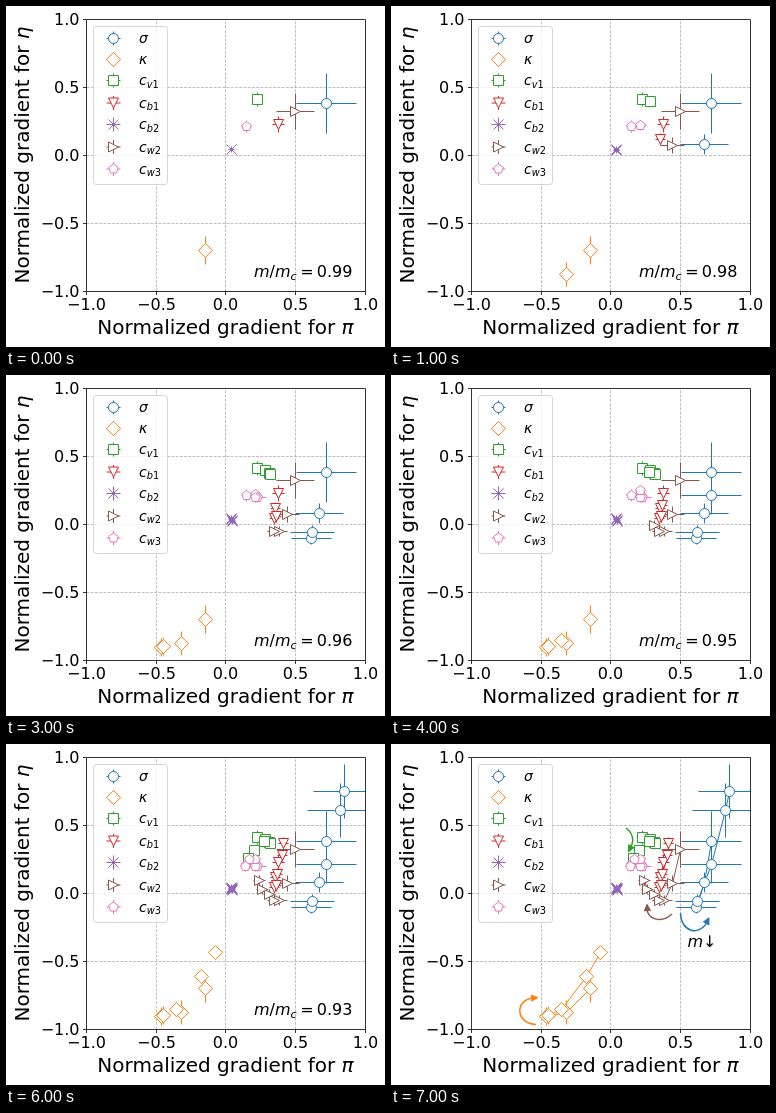
An HTML page that plays this animation: 379x341 px, repeating every 10000 ms.

```html
<!DOCTYPE html>
<html lang="en">
<head>
<meta charset="utf-8">
<title>Normalized gradients</title>
<style>
  html, body { margin: 0; width: 100%; height: 100%; overflow: hidden; background: #fff; }
  svg { display: block; width: 379px; height: 341px; }
  text { font-family: "DejaVu Sans", sans-serif; font-size: 16px; fill: #000; white-space: pre; }
  .title { font-size: 20px; text-anchor: middle; }
  .key { font-size: 14px; }
  .it { font-style: italic; }
</style>
</head>
<body>
<svg id="stage" viewBox="0 0 379 341"></svg>
<script>
const STEP = 1000, LOOP = 10000, LAST = 7;
const BOX = { left: 80.5, right: 359.5, top: 13.5, bottom: 285.5 };

// Points are [x, y] or [x, y, xError, yError]; err is the default error pair.
const series = [
  { name: 'σ', color: '#1f77b4', shape: 'circle', err: [30, 27], points: [
    [320, 97, 30, 30], [313, 138, 24, 10], [305, 163, 20, 6], [306, 157, 22, 7],
    [320, 120, 30, 19], [334, 66, 33, 27], [338, 47, 31, 27]] },
  { name: 'κ', color: '#ff7f0e', shape: 'diamond', err: [7, 9], points: [
    [199, 244, 6, 14], [175, 268, 7, 12], [155, 272], [157, 271],
    [170, 265, 6, 7], [195, 232, 5, 7], [209, 208, 4, 4]] },
  { name: 'c', sub: 'v', digit: 1, color: '#2ca02c', shape: 'square', err: [5, 5], points: [
    [251, 93, 5, 7], [259, 95], [263, 98], [264, 99], [258, 97], [248, 106], [242, 114]] },
  { name: 'c', sub: 'b', digit: 1, color: '#d62728', shape: 'down', err: [5, 6], points: [
    [272, 118, 6, 8], [269, 133], [268, 143], [270, 141], [271, 130], [276, 111], [277, 99]] },
  { name: 'c', sub: 'b', digit: 2, color: '#9467bd', shape: 'cross', err: [3, 3], points: [
    [225, 143], [225, 144], [226, 146], [226, 145], [225, 144], [226, 144], [225, 145]] },
  { name: 'c', sub: 'w', digit: 2, color: '#8c564b', shape: 'right', err: [6, 5], points: [
    [289, 105, 19, 18], [281, 139, 12, 8], [273, 156, 8, 5], [268, 156, 7, 5],
    [263, 150], [256, 145], [253, 136]] },
  { name: 'c', sub: 'w', digit: 3, color: '#e377c2', shape: 'pentagon', err: [5, 5], points: [
    [240, 120, 5, 6], [249, 119, 6, 5], [251, 122, 9, 5], [249, 122, 7, 5],
    [249, 115], [243, 115], [239, 122]] }
];

const pentagon = 'M' + [0, 1, 2, 3, 4].map(i => {
  const a = i * Math.PI * 0.4;
  return `${5 * Math.sin(a)} ${-5 * Math.cos(a)}`;
}).join('L') + 'Z';

const shapes = {
  circle: 'M-5 0A5 5 0 1 1 5 0A5 5 0 1 1 -5 0Z',
  diamond: 'M0 -7.07L7.07 0L0 7.07L-7.07 0Z',
  square: 'M-5 -5H5V5H-5Z',
  down: 'M0 5L-5 -5H5Z',
  right: 'M5 0L-5 5V-5Z',
  cross: 'M-5 -5L5 5M-5 5L5 -5',
  pentagon
};

const stage = document.getElementById('stage');

function add(parent, tag, attrs = {}, text) {
  const el = document.createElementNS('http://www.w3.org/2000/svg', tag);
  for (const key in attrs) el.setAttribute(key, attrs[key]);
  if (text !== undefined) el.textContent = text;
  return parent.appendChild(el);
}

const line = (parent, d, stroke, width = 1, more = {}) =>
  add(parent, 'path', { d, stroke, 'stroke-width': width, fill: 'none', ...more });

const marker = (parent, s, x, y) =>
  add(parent, 'path', {
    d: shapes[s.shape], transform: `translate(${x} ${y})`, fill: '#fff',
    stroke: s.color, 'stroke-linejoin': 'miter'
  });

const bars = (parent, s, x, y, ex, ey) =>
  line(parent, `M${x - ex} ${y}H${x + ex}M${x} ${y - ey}V${y + ey}`, s.color);

// Grid
const gridX = [150.5, 219.5, 289.5], gridY = [81.5, 149.5, 217.5];
const { left, right, top: upper, bottom } = BOX;
const dash = { 'stroke-dasharray': '2.96 1.28' };
gridX.forEach(x => line(stage, `M${x} ${bottom}V${upper}`, '#b0b0b0', 0.8, dash));
gridY.forEach(y => line(stage, `M${left} ${y}H${right}`, '#b0b0b0', 0.8, dash));

// Data: every error bar lies below every marker
const clip = add(add(stage, 'defs'), 'clipPath', { id: 'axes' });
add(clip, 'rect', { x: left, y: upper, width: right - left, height: bottom - upper });
const data = add(add(stage, 'g', { 'clip-path': 'url(#axes)' }), 'g', { transform: 'translate(.5 .5)' });
const barLayer = add(data, 'g');
const markLayer = add(data, 'g');
const timed = [];
const show = (el, from, to = LAST) => timed.push({ el, from, to });

for (const s of series) {
  show(line(markLayer, 'M' + s.points.map(p => `${p[0]} ${p[1]}`).join('L'), s.color), LAST);
  s.points.forEach(([x, y, ex = s.err[0], ey = s.err[1]], i) => {
    show(bars(barLayer, s, x, y, ex, ey), i);
    show(marker(markLayer, s, x, y), i);
  });
}

// Turning arrows
const arrows = add(stage, 'g');
show(arrows, LAST);
function arrow(color, d, x, y, angle) {
  line(arrows, d, color, 1.5);
  add(arrows, 'path', {
    d: 'M0 0L-6 -3V3Z', fill: color, stroke: color, 'stroke-linejoin': 'round',
    transform: `translate(${x} ${y}) rotate(${angle})`
  });
}
arrow('#2ca02c', 'M235 84Q245.5 92 239.5 104', 237.5, 107.5, 118);
arrow('#ff7f0e', 'M145 280.5C125 280 123 256 142 254', 146.5, 253.5, -6);
arrow('#8c564b', 'M281 170C270 180 256 175 256 164', 256, 160.5, -94);
arrow('#1f77b4', 'M289.5 169C290 188 308 193 316.5 177.5', 318, 174, -62);

// Axes
line(stage, `M${left} ${upper}H${right}V${bottom}H${left}Z`, '#000', 0.8);
[left, ...gridX, right].forEach((x, i) => {
  line(stage, `M${x} ${bottom}v3.5`, '#000', 0.8);
  add(stage, 'text', { x, y: 304, 'text-anchor': 'middle' }, tickLabel(i / 2 - 1));
});
[bottom, ...gridY.slice().reverse(), upper].forEach((y, i) => {
  line(stage, `M${left} ${y}h-3.5`, '#000', 0.8);
  add(stage, 'text', { x: 73.5, y: y + 5.5, 'text-anchor': 'end' }, tickLabel(i / 2 - 1));
});
function tickLabel(v) {
  return v.toFixed(1).replace('-', '−');
}

function title(greek, attrs) {
  const t = add(stage, 'text', { class: 'title', ...attrs });
  add(t, 'tspan', {}, 'Normalized gradient for ');
  add(t, 'tspan', { class: 'it' }, greek);
}
title('π', { x: 219.5, y: 328 });
title('η', { transform: 'translate(23 149) rotate(-90)' });

// Mass label, replaced by the direction mark at the end
const mass = add(stage, 'text', { x: 248, y: 271 });
add(mass, 'tspan', { class: 'it' }, 'm');
add(mass, 'tspan', {}, '/');
add(mass, 'tspan', { class: 'it' }, 'm');
add(mass, 'tspan', { class: 'it', dy: 2.5, 'font-size': 11.2, style: 'font-size:11.2px' }, 'c');
add(mass, 'tspan', { dx: 3.4, dy: -2.5 }, '=');
const value = add(mass, 'tspan', { dx: 3.2 }, '0.99');
show(mass, 0, LAST - 1);

const falling = add(stage, 'text', { x: 296.5, y: 203 });
add(falling, 'tspan', { class: 'it' }, 'm');
add(falling, 'tspan', {}, '↓');
show(falling, LAST);

// Legend
add(stage, 'rect', {
  x: 87.5, y: 20.5, width: 74, height: 158, rx: 2.8,
  fill: '#fff', 'fill-opacity': 0.8, stroke: '#ccc', 'stroke-opacity': 0.8
});
[32.5, 53.5, 74.5, 97, 118.5, 141, 163].forEach((y, i) => {
  const s = series[i];
  bars(stage, s, 107.5, y, 7, 7);
  marker(stage, s, 107.5, y);
  const t = add(stage, 'text', { class: 'key', x: 133, y: y + 4.7 });
  add(t, 'tspan', { class: 'it' }, s.name);
  if (s.sub) {
    const small = 'font-size:9.8px';
    add(t, 'tspan', { class: 'it', dy: 2.3, style: small }, s.sub);
    add(t, 'tspan', { style: small }, s.digit);
  }
});

const start = performance.now();
let current = -1;
function draw() {
  const time = (performance.now() - start) % LOOP;
  const step = Math.min(LAST, Math.floor(time / STEP));
  if (step !== current) {
    current = step;
    value.textContent = (0.99 - Math.min(step, LAST - 1) / 100).toFixed(2);
    for (const { el, from, to } of timed)
      el.style.display = step >= from && step <= to ? '' : 'none';
  }
  requestAnimationFrame(draw);
}
draw();
</script>
</body>
</html>
```
